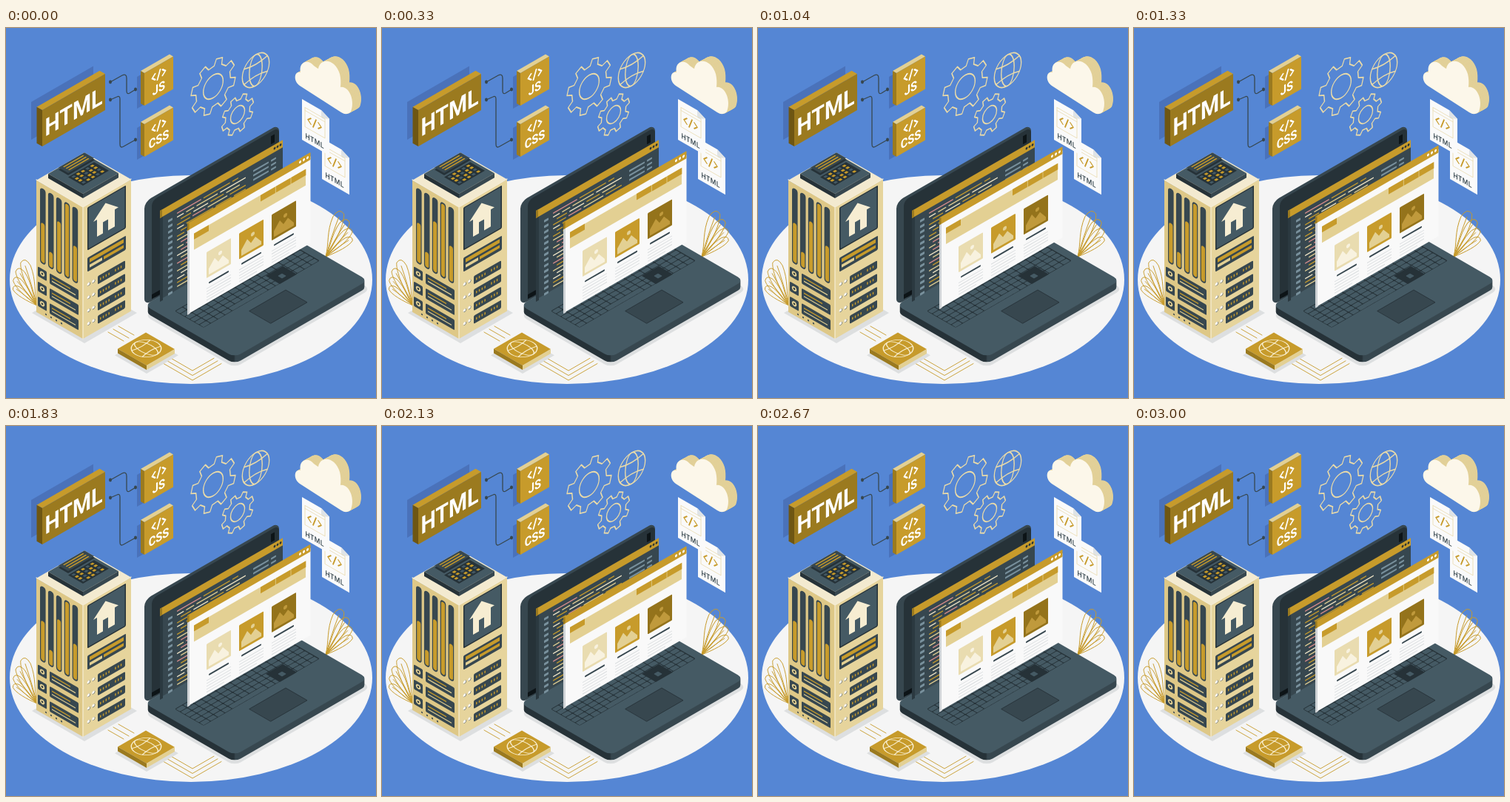
An HTML page with a canvas that plays this animation: 500x500 px, repeating every 3040 ms.

```html
<!DOCTYPE html>
<html lang="en">
<head>
<meta charset="utf-8">
<title>Web development</title>
<style>
html, body { margin: 0; width: 100%; height: 100%; overflow: hidden; background: #5586d4; }
canvas { display: block; width: 100vw; height: 100vh; }
</style>
</head>
<body>
<canvas id="stage"></canvas>
<script>
const LOOP = 3040, PEAK = 1400, LIFT = 9.8, S = 0.577;
const GOLD = '#c79b2b', DEEP = '#9b7a1f', BROWN = '#6e5613', CREAM = '#e3d093', PALE = '#f1e7c8';
const INK = '#263238', SLATE = '#37474f', STEEL = '#455a64', GREY = '#78909c';
const WHITE = '#fafafa', LINE = '#eadba8', SHADE = '#dddfe0', NAVY = '#4a72ba';

const canvas = document.getElementById('stage');
const ratio = Math.max(1, window.devicePixelRatio || 1);
canvas.width = canvas.height = 500 * ratio;
const scene = document.createElement('canvas');
scene.width = scene.height = canvas.width;
let c;

function repeat(n, draw) { for (let i = 0; i < n; i++) draw(i); }
function random(seed) {
  return () => (seed = (seed * 16807) % 2147483647) / 2147483647;
}
function fill(color) { c.fillStyle = color; c.fill(); }
function stroke(color, width) { c.strokeStyle = color; c.lineWidth = width; c.stroke(); }
function shape(color, d) { c.fillStyle = color; c.fill(new Path2D(d)); }
function line(color, width, d) {
  c.strokeStyle = color;
  c.lineWidth = width;
  c.stroke(new Path2D(d));
}
function rect(x, y, w, h, r = 0) { c.beginPath(); c.roundRect(x, y, w, h, r); }
function box(color, ...r) { rect(...r); fill(color); }
function frame(color, width, ...r) { rect(...r); stroke(color, width); }
function oval(x, y, rx, ry = rx) { c.beginPath(); c.ellipse(x, y, rx, ry, 0, 0, 7); }
function dot(color, ...o) { oval(...o); fill(color); }
function ring(color, width, ...o) { oval(...o); stroke(color, width); }

function within(matrix, draw) {
  c.save();
  c.transform(...matrix);
  draw();
  c.restore();
}
// Vertical plane whose horizontal edges have the given slope.
function plane(x, y, slope, draw, sx = 1) { within([sx, slope * sx, 0, 1, x, y], draw); }
// Ground plane seen from its front corner: first axis right, second axis left.
function ground(x, y, draw) { within([1, -S, -1, -S, x, y], draw); }
function block(x, y, left, right, height, top, side, front) {
  ground(x, y, () => box(top, 0, 0, right, left));
  plane(x, y, S, () => box(side, -left, 0, left, height));
  plane(x, y, -S, () => box(front, 0, 0, right, height));
}

function label(text, x, y, slope, size, color, weight, spacing = 0) {
  plane(x, y, slope, () => {
    c.font = `${weight} ${size}px Roboto, Inter, sans-serif`;
    c.letterSpacing = spacing + 'px';
    c.textAlign = 'center';
    c.fillStyle = color;
    c.fillText(text, spacing / 2, 0);
  }, 0.866);
}
function codeMark(x, y, slope, color, width) {
  plane(x, y, slope, () => line(color, width, 'M-5 -4L-9 0L-5 4M5 -4L9 0L5 4M2 -6L-2 6'));
}

function sign() {
  plane(34, 100, -S, () => box(NAVY, 0, 0, 84, 51));
  block(49, 111, 7.5, 85, 49, GOLD, BROWN, DEEP);
  label('HTML', 91.5, 124.5, -S, 33, '#fff', 700);
}
function tile(y, text) {
  plane(177, y + 5, -S, () => box(NAVY, 0, 0, 8, 43));
  block(187, y, 5, 39, 44, CREAM, DEEP, GOLD);
  codeMark(206.5, y + 2, -S, '#fff', 2);
  label(text, 206.5, y + 26, -S, 17, '#fff', 700);
}
function links() {
  line(SLATE, 1.3, 'M141 73L157 64Q163 61 163 68V85Q163 90 167 88L175 83');
  line(SLATE, 1.3, 'M141 97L150 93Q154 91 154 96V157Q154 163 159 160L175 151');
  repeat(4, i => dot(SLATE, i % 2 ? 175 : 141, [73, 83, 97, 151][i], 2, 2.4));
}

function gear(x, y, r, turn) {
  plane(x, y, -S, () => {
    const step = Math.PI / 4;
    c.beginPath();
    repeat(32, i => {
      const k = i % 4;
      const a = turn + (Math.floor(i / 4) + [-0.29, -0.18, 0.18, 0.29][k]) * step;
      const d = k % 3 ? r : r * 0.77;
      c.lineTo(d * Math.cos(a), d * Math.sin(a));
    });
    c.closePath();
    stroke(LINE, 1.6);
    ring(LINE, 1.6, 0, 0, r * 0.44);
  }, 0.866);
}
function globe(r, color, w) {
  ring(color, w, 0, 0, r);
  ring(color, w, 0, 0, r * 0.48, r);
  [-1, 1].forEach(k => {
    const x = r * 0.86, y = k * r * 0.5;
    line(color, w, `M${-x} ${y}Q0 ${y * 0.5} ${x} ${y}`);
  });
}

function cloud() {
  const d = 'M397 78C388 72 389 58 398 60C395 46 408 41 416 51Q420 54 422 55' +
    'C425 39 445 42 451 62Q453 70 452 80C464 78 472 99 466 113Q461 119 453 114Z';
  for (let i = 24; i >= 0; i--) {
    within([1, 0, 0, 1, i / 2, -i * 0.27], () => shape(i ? '#e2d098' : '#fcf7ea', d));
  }
}
function doc(x, y) {
  plane(x, y, S, () => {
    shape(WHITE, 'M0 0H26L37 5.5V55H0Z');
    shape('#dfe3e6', 'M26 0V8Q26 10 28 10L37 5.5Z');
    frame('#e8d9ab', 0.8, 4, 9, 27, 26);
    line('#e8d9ab', 0.8, 'M4 13H31');
  });
  codeMark(x + 17, y + 33, S, GOLD, 1.6);
  label('HTML', x + 17, y + 60, S, 10, SLATE, 500, 0.5);
}

function plant(x, y, flip) {
  within([flip, 0, 0, 1, x, y], () => repeat(4, i => {
    const k = 64 - i * 7;
    c.save();
    c.rotate(-1.25 + i * 0.21);
    c.scale(k, k);
    line(GOLD, 0.9 / k, 'M0 0C.3 -.02 .5 -.15 .85 -.12Q1.08 -.06 .98 .08C.8 .16 .4 .1 0 0Q.5 -.02 .88 0');
    c.restore();
  }));
}
function floor() {
  dot('#f5f5f5', 250, 340, 245, 141);
  plant(42, 375, -0.9);
  plant(432, 309, 1);
  repeat(3, i => {
    const y = 476 - i * 6.5, d = 39 - i * 5, h = d * S;
    line(GOLD, 0.9, `M${252 - d} ${y - h}L252 ${y}L${252 + d} ${y - h}`);
    line(GOLD, 0.9, `M${138 + i * 7} ${411 - i * 4}l21 12`);
  });
}

function calculator() {
  block(104, 224, 47, 48, 6, STEEL, INK, SLATE);
  ground(84, 199, () => box(INK, 0, 0, 36, 13));
  ground(84, 196, () => {
    box(SLATE, 0, 0, 35, 13);
    repeat(3, i => box(GOLD, 4, 2.5 + i * 3.5, 27, 1.4));
  });
  ground(104, 213, () => {
    box(INK, 0, 0, 35, 20);
    repeat(20, i => box(i % 3 ? GOLD : STEEL, 2.5 + (i % 5) * 6.3, 2 + Math.floor(i / 5) * 4.5, 3.6, 2.8));
  });
}
function tower() {
  ground(106, 426, () => box(SHADE, 0, 0, 71, 71));
  block(104, 242, 63, 65, 178, '#f3ead0', '#dec887', '#e6d49c');
  line('#f5edd6', 1.2, 'M41 205L104 242L169 204M104 242V420');
  calculator();

  plane(41, 204, S, () => {
    [0.46, 0.8, 0.31, 0, 0.52].forEach((level, i) => {
      const x = 5 + i * 10.9;
      box(SLATE, x, 8, 7.6, 102, 3.8);
      box(GOLD, x + 1.2, 10 + level * 97, 5.2, 98 - level * 97, 2.6);
    });
    repeat(3, i => {
      const y = 117 + i * 20.3;
      box(SLATE, 2, y, 12, 13, 1.5);
      dot(CREAM, 8, y + 6.5, 3.2);
      dot(INK, 8, y + 6.5, 1.3);
      box(SLATE, 18, y, 39, 14, 1.5);
      box(GOLD, 21, y + 4, 25, 1.5);
      box(CREAM, 21, y + 8.5, 32, 1.4);
    });
    repeat(4, i => dot(SLATE, 13 + i * 7, 175.5, 1.1));
  });

  plane(104, 242, -S, () => {
    box(INK, 6, 4, 52, 58, 1.5);
    box(STEEL, 7.5, 5.5, 49, 55, 1);
    shape('#f6edd2', 'M14 28L30.5 12L48 28H43V51H34V36H27V51H19V28Z');
    box(SLATE, 6, 72, 52, 19, 1.5);
    box(GOLD, 9, 75, 46, 5);
    box(CREAM, 9, 83, 17, 4);
    box(GOLD, 28, 83, 27, 4);
    repeat(4, i => {
      const y = 105 + i * 17.8;
      [7.5, 14].forEach(x => {
        dot(SLATE, x + 0.4, y + 3.6, 2);
        dot('#fffaf0', x, y + 3.2, 1.9);
      });
      box(SLATE, 20, y, 37, 11, 1.5);
      repeat(7, k => box(GOLD, 23 + k * 3.8 + (k > 3 ? 5 : 0), y + 4, 1.5, 3.2));
    });
  });
}

function laptop() {
  ground(309, 459, () => box(SHADE, 0, 0, 184, 122, 8));
  // Lid
  plane(187, 235, -S, () => {
    box(SLATE, 0, 0, 182, 140, 9);
    box(INK, 10, 4, 172, 134, 7);
    box('#0d1417', 171, 10, 5, 11);
    box('#0d1417', 10, 131, 11, 6);
  });
  // Base
  for (let i = 9; i >= 0; i--) ground(309, 445 + i, () => {
    const side = c.createLinearGradient(-0.5, 0.5, 0.5, -0.5);
    side.addColorStop(0, INK);
    side.addColorStop(1, SLATE);
    box(i ? side : STEEL, 0, 0, 180, 122, 8);
  });
  ground(267, 405, () => {
    box(INK, 0, 0, 157, 39, 2);
    repeat(96, i => box(STEEL, 0.7 + (i % 16) * 9.75, 0.6 + Math.floor(i / 16) * 6.4, 8.8, 5.6, 1));
    box(STEEL, 40, 0.6, 47, 5.6, 1);
  });
  ground(370, 346, () => {
    box(INK, 0, 0, 23, 19);
    box(STEEL, 8, 5, 6, 6, 1);
  });
  ground(358, 399, () => {
    box(SLATE, 0, 0, 49, 29);
    frame(INK, 0.7, 0, 0, 49, 29);
  });
}

function codeWindow() {
  const rnd = random(37), tints = [GOLD, CREAM, PALE, GOLD, '#d98c8c'];
  plane(208, 249, -S, () => {
    box('#2b3940', 0, 6, 4, 115);
    box(SLATE, 4, 6, 162, 112);
    box(GOLD, 0, -2, 166, 10);
    box(DEEP, 0, -2, 3, 10);
    repeat(3, i => dot(INK, 155 + i * 4, 3, 1.4, 1.6));
    repeat(14, i => box(GREY, 11, 17 + i * 7.6, 6, 3.4, 0.8));
    repeat(20, i => {
      let x = 23 + Math.floor(rnd() * 2) * 5;
      while (x < 105) {
        const w = 5 + rnd() * 32;
        box(tints[Math.floor(rnd() * 5)], x, 14 + i * 5.2, Math.min(w, 116 - x), 1.5, 0.7);
        x += w + 3;
      }
    });
    repeat(6, i => box(GREY, i < 3 ? 126 : 150, 16 + (i % 3) * 6, i < 3 ? 21 : 7, 2.4, 0.8));
  });
}

function globeTile() {
  ground(190, 467, () => box(SHADE, 0, 0, 43, 43));
  block(190, 456, 39, 38, 6, GOLD, DEEP, CREAM);
  within([0.866, -0.5, 0.866, 0.5, 189.5, 433], () => globe(16.5, '#f9efd0', 1.2));
}

function card(x, bg, hill) {
  box(bg, x, 53, 33, 35, 1);
  shape(hill, `M${x + 3} 85v-8l8 -10l5 8l6 -5l8 11v4Z`);
  dot(hill, x + 18.5, 64.5, 2.6);
  box(SLATE, x + 3, 95, 27, 2.2, 1);
  repeat(5, i => box('#d3d7d9', x, 102 + i * 3.9, i === 4 ? 24 : 33, 0.8));
}
function panel() {
  plane(245, 265, -S, () => {
    box('#cfd3d6', 0, 4, 4, 119, 1);
    box('#f9f9f9', 3, 4, 163.5, 118, 1);
    box(GOLD, 0, -1, 166.5, 10, 1);
    box(DEEP, 0, 0, 2.5, 9);
    box(CREAM, 9, 18, 151, 22);
    box(GOLD, 9, 18, 20, 8);
    repeat(3, i => {
      dot('#fff', 152.5 + i * 5, 4, 1.5, 1.8);
      box(GOLD, 99 + i * 20.7, 18, 19.9, 8.5);
      card(26 + i * 44, ['#e9dcb0', GOLD, '#94731b'][i], ['#f8f2df', CREAM, '#c09a3c'][i]);
    });
  });
}

function use(target) {
  c = target.getContext('2d');
  c.setTransform(ratio, 0, 0, ratio, 0, 0);
  c.lineCap = c.lineJoin = 'round';
}

function drawScene() {
  use(scene);
  box('#5586d4', 0, 0, 500, 500);
  floor();
  sign();
  tile(61, 'JS');
  tile(130, 'CSS');
  links();
  gear(280, 79, 35, -0.5);
  gear(313, 117, 25, -0.3);
  plane(337.5, 57, -S, () => globe(21, LINE, 1.6), 0.866);
  cloud();
  doc(427, 149);
  doc(400, 96);
  tower();
  laptop();
  codeWindow();
  globeTile();
}

// Slightly quicker start on the way up, plain cosine on the way down.
function lift(t) {
  const wave = u => (1 - Math.cos(Math.PI * u)) / 2;
  if (t < PEAK) return LIFT * (t / PEAK + wave(t / PEAK)) / 2;
  return LIFT * wave((LOOP - t) / (LOOP - PEAK));
}

let start = null;
function tick(now) {
  if (start === null) start = now;
  use(canvas);
  c.drawImage(scene, 0, 0, 500, 500);
  c.translate(0, -lift((now - start) % LOOP));
  panel();
  requestAnimationFrame(tick);
}

drawScene();
requestAnimationFrame(tick);
</script>
</body>
</html>
```
